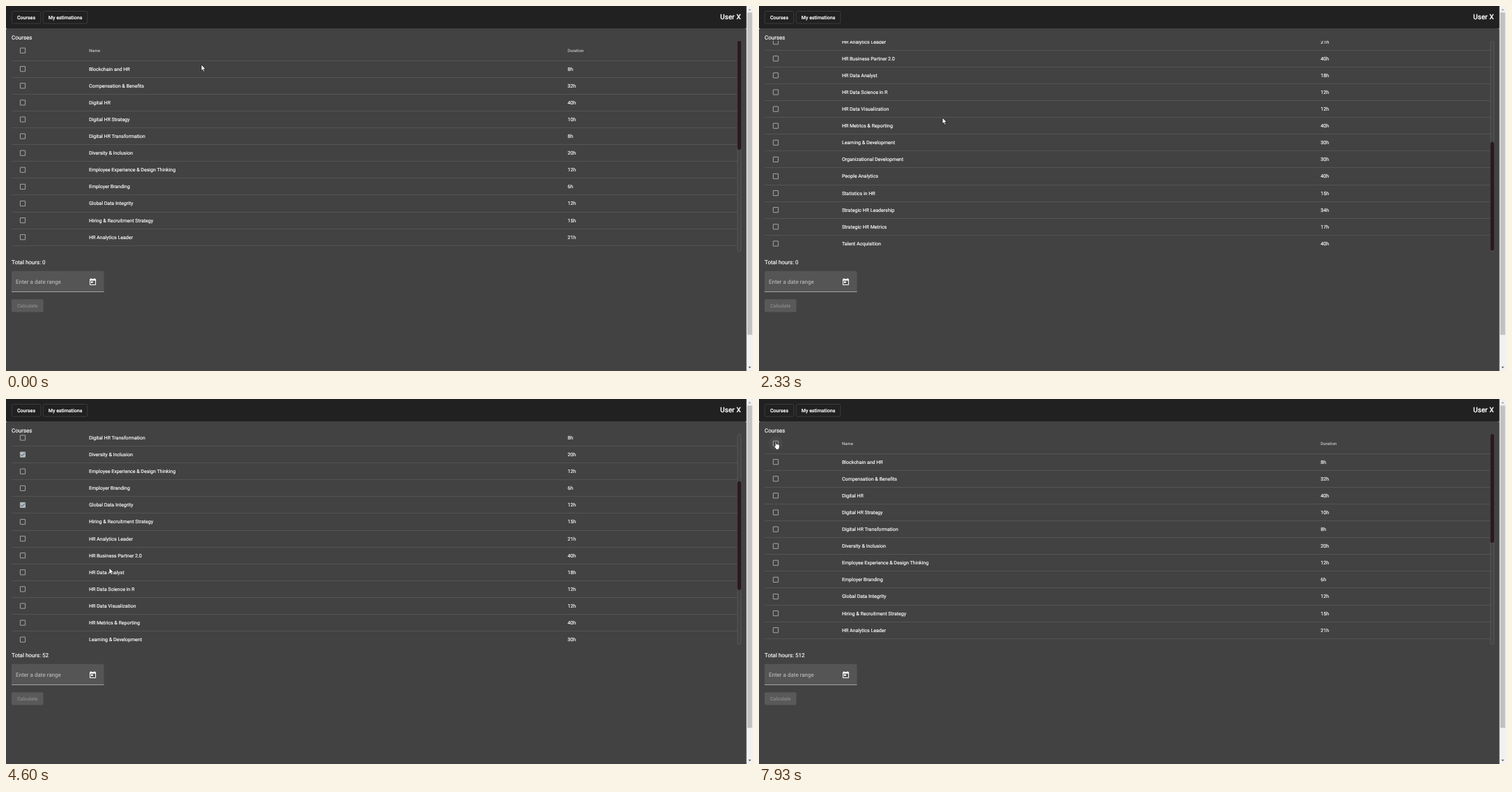
Write an HTML page that moves like this. It is 1071 px wide and 523 px high and loops after 8000 ms.

```html
<!DOCTYPE html>
<html lang="en">
<head>
<meta charset="utf-8">
<title>Courses</title>
<style>
  html, body { margin: 0; width: 100%; height: 100%; overflow: hidden; background: #424242; }
  svg { display: block; }
  text { font: 7.04px Roboto, sans-serif; fill: #fff; stroke: #fff; stroke-width: .16; text-rendering: geometricPrecision; white-space: pre; }
  .medium { font-weight: 500; }
  .body { font-size: 8.03px; }
  .head { font-size: 6.03px; font-weight: 500; }
  .user { font-size: 10.04px; font-weight: 500; }
  .soft { fill: #c6c6c6; stroke: none; }
  .off { fill: #8c8c8c; stroke: none; }
  .outline { fill: none; stroke: #3c3c3c; }
  .line { fill: #545454; shape-rendering: crispEdges; }
  .box { fill: none; stroke: #c0c0c0; stroke-width: .8; }
  .on .box { fill: #b0bec5; stroke: #b0bec5; }
  .tick, .dash { fill: none; stroke: #424242; visibility: hidden; }
  .on .tick, .mixed .dash { visibility: visible; }
  .mixed .tick { visibility: hidden; }
  .pointer { fill: #fff; stroke: #000; stroke-width: .6; stroke-linejoin: round; }
</style>
</head>
<body>
<svg width="1071" height="523" viewBox="0 0 1071 523">
  <defs>
    <clipPath id="view"><rect x="8" y="50" width="1046" height="301.2"/></clipPath>
    <g id="mark">
      <rect class="box" x="-3.6" y="-3.6" width="7.2" height="7.2" rx=".4"/>
      <path class="tick" d="M-2.7 .2L-1 1.9 2.8-1.9"/>
      <path class="dash" d="M-2.5 0H2.5"/>
    </g>
  </defs>
  <rect width="1071" height="523" fill="#424242"/>

  <rect width="1062" height="32" fill="#212121"/>
  <path d="M0 32h1v1H0zM1060.5 32h1v1h-1z" fill="#ddd"/>
  <rect class="outline" x="8.2" y="7.5" width="41.6" height="17.6" rx="2"/>
  <rect class="outline" x="53.3" y="7.5" width="63.4" height="17.6" rx="2"/>
  <text class="medium" x="16" y="18.5">Courses</text>
  <text class="medium" x="60.8" y="18.5">My estimations</text>
  <text class="user" x="1024" y="19.1">User X</text>

  <text class="body" x="8" y="48">Courses</text>
  <g clip-path="url(#view)"><g id="table"></g></g>
  <rect x="1048.9" y="50.4" width="4.8" height="301.4" rx="2.4" fill="#454545" stroke="#5c5c5c" stroke-width=".8"/>
  <rect id="thumb" x="1048.6" y="50" width="5.4" height="156" rx="2.7" fill="#2b1a1d"/>

  <text class="body" id="total" x="8" y="369.6"></text>
  <path d="M8 409.6V382a2.2 2.2 0 0 1 2.2-2.2H138.3a2.2 2.2 0 0 1 2.2 2.2V409.6z" fill="#555"/>
  <rect x="8" y="409" width="132.5" height=".8" fill="#bbb"/>
  <text class="body soft" x="14" y="398">Enter a date range</text>
  <path transform="translate(118.4 389.5) scale(.502)" fill="#fff" fill-rule="evenodd"
    d="M19 3h-1V1h-2v2H8V1H6v2H5a2 2 0 0 0-2 2V19a2 2 0 0 0 2 2h14a2 2 0 0 0 2-2V5a2 2 0 0 0-2-2zM19 19H5V8h14zM7 10h5v5H7z"/>
  <rect x="8" y="420.3" width="45.5" height="18.2" rx="2" fill="#595959"/>
  <text class="medium off" x="16" y="431.6">Calculate</text>

  <rect x="1061.6" width="9.4" height="523" fill="#f1f1f1"/>
  <rect x="1062.8" y="9.4" width="7" height="461.8" fill="#c1c1c1"/>
  <path d="M1064.4 6.2l1.9-2.2 1.9 2.2z" fill="#999"/>
  <path d="M1064.4 516.8l1.9 2.2 1.9-2.2z" fill="#505050"/>

  <g id="cursor">
    <path class="pointer" id="arrow" d="M0 0V8.8L2 7 3.4 10.2 4.9 9.6 3.5 6.4H6.2z"/>
    <path class="pointer" id="hand" d="M-.8 7V.8Q0-.6 .8 .8V4Q1.7 3.2 2.5 4.2 3.4 3.6 4 4.5 5.2 4.2 5.4 5.4V8.2Q5.2 9.6 4.4 10.4V11.6H.2V10.6L-2.6 7Q-2.8 5.6-.8 7z"/>
  </g>
</svg>
<script>
const LOOP = 8000, FPS = 15, TRAVEL = 267;
const PITCH = 24.1, FIRST = 90.2, HEAD = 63.8, BOX_X = 24;
const courses = [
  ["Blockchain and HR", 8], ["Compensation & Benefits", 32], ["Digital HR", 40],
  ["Digital HR Strategy", 10], ["Digital HR Transformation", 8], ["Diversity & Inclusion", 20],
  ["Employee Experience & Design Thinking", 12], ["Employer Branding", 6],
  ["Global Data Integrity", 12], ["Hiring & Recruitment Strategy", 15],
  ["HR Analytics Leader", 21], ["HR Business Partner 2.0", 40], ["HR Data Analyst", 18],
  ["HR Data Science in R", 12], ["HR Data Visualization", 12], ["HR Metrics & Reporting", 40],
  ["Learning & Development", 30], ["Organizational Development", 30], ["People Analytics", 40],
  ["Statistics in HR", 15], ["Strategic HR Leadership", 34], ["Strategic HR Metrics", 17],
  ["Talent Acquisition", 40]
];
const everyRow = [...courses.keys()];

// Scroll glides, each with the power of its easing curve
const scrolls = [
  { start: 1400, end: 2299, to: 280, power: 1.407 },
  { start: 2400, end: 2733, to: 0, power: 1 },
  { start: 4200, end: 4733, to: 167.4, power: .852 },
  { start: 6067, end: 6600, to: 0, power: 1 }
];

const HEADER = -1;
const clicks = [
  { time: 3067, name: "Compensation & Benefits" },
  { time: 3600, name: "Diversity & Inclusion" },
  { time: 3867, name: "Global Data Integrity" },
  { time: 5133, name: "HR Data Visualization" },
  { time: 5467, name: "HR Business Partner 2.0" },
  { time: 7067 },
  { time: 7733 }
].map(({ time, name }) =>
  ({ time, row: name ? courses.findIndex(c => c[0] === name) : HEADER }));

const wander = [
  { start: 733, end: 1133, x: 207, y: 179 },
  { start: 1133, end: 1267, x: 264, y: 162 },
  { start: 1467, end: 1600, x: 263, y: 160 },
  { start: 3933, end: 4200, x: 148, y: 242 },
  { start: 4600, end: 4733, x: 137, y: 187 },
  { start: 5533, end: 5733, x: 219, y: 130 },
  { start: 5733, end: 6067, x: 54, y: 84 }
];

const $ = id => document.getElementById(id);
const table = $("table");
const clamp = u => Math.min(1, Math.max(0, u));
const progress = (move, t) => clamp((t - move.start) / (move.end - move.start));
const smooth = u => u * u * (3 - 2 * u);
const mix = (a, b, u) => a + (b - a) * u;
const boxY = row => row === HEADER ? HEAD : FIRST + row * PITCH;
const sumHours = rows => [...rows].reduce((sum, i) => sum + courses[i][1], 0);

const scrollAt = t => scrolls.reduce(
  (pos, s) => mix(pos, s.to, progress(s, t) ** s.power), 0);

// Every click is preceded by a trip to its checkbox
const trips = clicks.map(({ time, row }) => ({
  start: time - TRAVEL, end: time, x: BOX_X, y: boxY(row) - scrollAt(time) - 3, hand: true
}));
const moves = [...wander, ...trips].sort((a, b) => a.start - b.start);

function add(tag, attrs, text) {
  const el = document.createElementNS("http://www.w3.org/2000/svg", tag);
  for (const name in attrs) el.setAttribute(name, attrs[name]);
  if (text) el.textContent = text;
  return table.appendChild(el);
}

function addCheckbox(row) {
  const box = add("g", { transform: `translate(${BOX_X} ${boxY(row)})` });
  for (const part of $("mark").children) box.appendChild(part.cloneNode(true));
  return box;
}

function addRow(row, cells, cls, drop) {
  cells.forEach((cell, i) =>
    add("text", { x: i ? 805.3 : 118.9, y: boxY(row) + drop, class: cls }, cell));
  add("rect", { class: "line", x: 8, y: 77.6 + (row + 1) * PITCH, width: 1040.5, height: 1 });
  return addCheckbox(row);
}

const ripple = add("circle", { cx: BOX_X, cy: HEAD, r: 10, fill: "#fff" });
const headBox = addRow(HEADER, ["Name", "Duration"], "head soft", 2.1);
const boxes = courses.map(([name, hours], i) => addRow(i, [name, hours + "h"], "", 2.4));

function drawSelection(t) {
  let picked = new Set(), total = 0;
  for (const { row } of clicks.filter(c => c.time <= t)) {
    if (row === HEADER) {
      picked = new Set(picked.size < courses.length ? everyRow : []);
      total = sumHours(everyRow);
    } else {
      total = sumHours(picked); // the shown sum lags one click behind
      picked.add(row);
    }
  }
  boxes.forEach((box, i) => box.setAttribute("class", picked.has(i) ? "on" : ""));
  const full = picked.size === courses.length;
  headBox.setAttribute("class", full ? "on" : picked.size ? "on mixed" : "");
  $("total").textContent = "Total hours: " + total;
}

function drawCursor(t) {
  let x = 280, y = 84, hand = false;
  for (const move of moves) {
    const u = smooth(progress(move, t));
    x = mix(x, move.x, u);
    y = mix(y, move.y, u);
    if (u > 0) hand = !!move.hand && Math.abs(x - BOX_X) < 4;
  }
  $("cursor").setAttribute("transform", `translate(${x} ${y})`);
  $("hand").style.display = hand ? "" : "none";
  $("arrow").style.display = hand ? "none" : "";
  ripple.setAttribute("opacity", hand && y < HEAD ? .04 : 0);
}

function draw(time) {
  // The picture advances in 15 steps per second
  const t = Math.round(Math.floor((time + 5) * FPS / 1000) * 1000 / FPS);
  const scroll = scrollAt(t);
  table.setAttribute("transform", `translate(0 ${-scroll})`);
  $("thumb").setAttribute("y", 50 + scroll * .517);
  drawSelection(t);
  drawCursor(t);
}

const start = performance.now();
function tick() {
  draw((performance.now() - start) % LOOP);
  requestAnimationFrame(tick);
}
tick();
</script>
</body>
</html>
```
